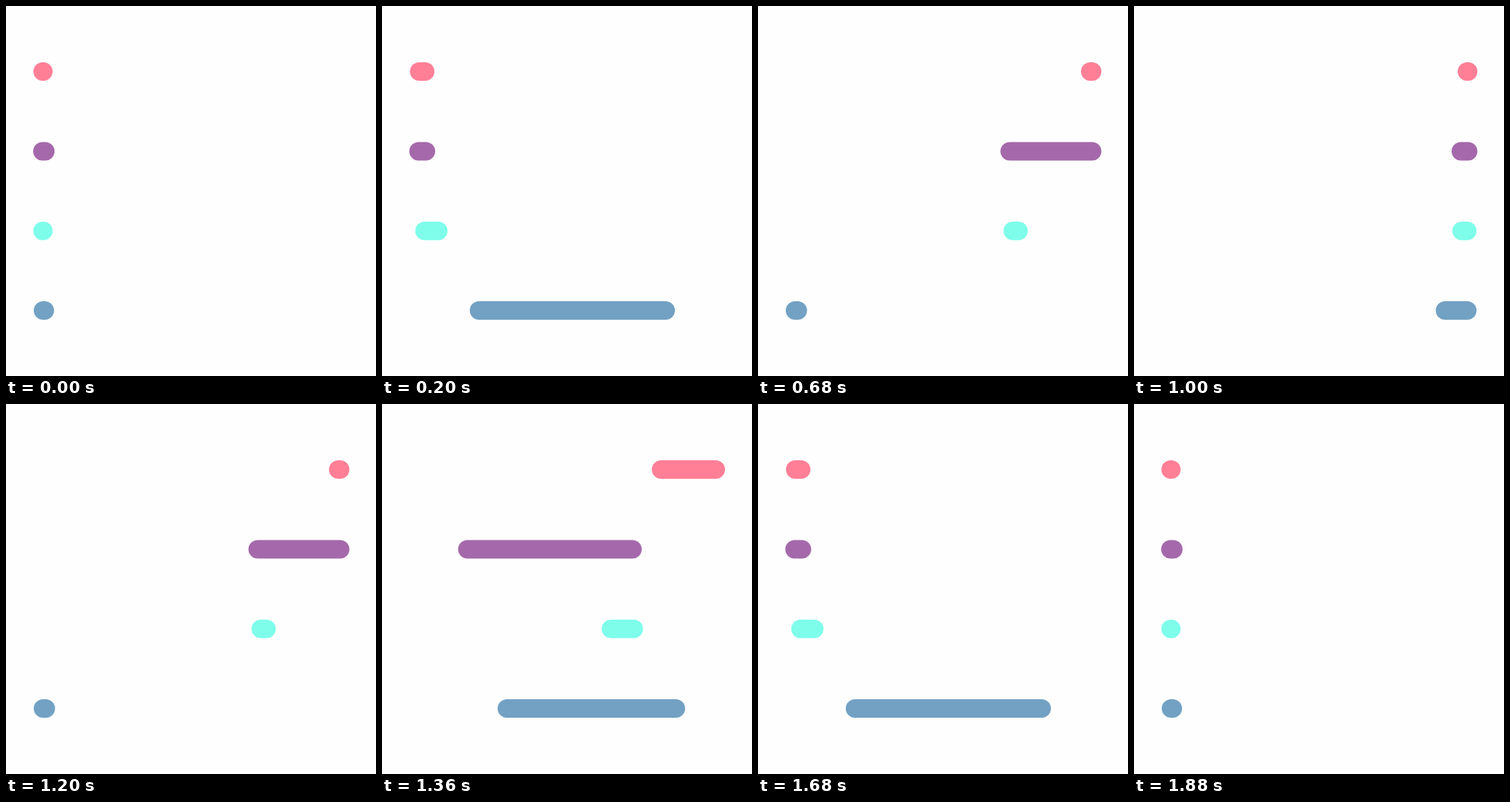
Write an HTML page that moves like this. It is 480 px wide and 480 px high and loops after 1920 ms.

```html
<!DOCTYPE html>
<html>
<head>
<meta charset="utf-8">
<style>
  html, body { margin: 0; height: 100%; overflow: hidden; background: #fefefe; }
  svg { display: block; width: 480px; height: 480px; }
</style>
</head>
<body>
<svg viewBox="0 0 480 480"></svg>
<script>
const STEP = 40, FRAMES = 48, HEIGHT = 24;

// Each edge of a bar is a curve through [ms, x] keys.
const bars = [
  { color: '#ff7f97', y: 73,
    left: [[0, 35.5], [280, 37], [400, 113], [500, 335], [680, 419], [920, 420]],
    right: [[0, 60.5], [200, 68], [300, 230], [400, 444], [680, 445.5], [920, 445.5]] },
  { color: '#a569ab', y: 176.5,
    left: [[0, 35.2], [400, 36], [460, 51], [540, 120], [680, 314.5], [780, 384.5], [880, 412], [920, 416]],
    right: [[0, 63], [200, 69], [300, 96], [400, 167], [540, 361], [620, 430], [680, 445.5], [920, 445.5]] },
  { color: '#7efdeb', y: 279.7,
    left: [[0, 35.5], [280, 50], [400, 151.5], [520, 285], [680, 318.5], [760, 335], [880, 413], [920, 419]],
    right: [[0, 60.5], [200, 85], [300, 190], [400, 328.5], [680, 350], [780, 415], [880, 444.3], [920, 445]] },
  { color: '#72a1c3', y: 383,
    left: [[0, 36], [140, 42], [320, 360], [400, 413], [520, 150], [580, 45], [680, 36], [740, 38], [800, 190], [880, 391.5], [920, 408]],
    right: [[0, 62.3], [200, 380], [280, 444], [400, 444.3], [500, 430], [560, 250], [620, 95], [680, 63.6], [780, 360], [880, 444.4], [920, 444.5]] }
];

const svg = document.querySelector('svg');
for (const bar of bars) {
  bar.rect = document.createElementNS(svg.namespaceURI, 'rect');
  const attrs = { y: bar.y, height: HEIGHT, rx: HEIGHT / 2, fill: bar.color };
  for (const name in attrs) bar.rect.setAttribute(name, attrs[name]);
  svg.append(bar.rect);
}

const secant = (a, b) => (b[1] - a[1]) / (b[0] - a[0]);

// Harmonic mean of the neighbouring slopes keeps the curve from overshooting.
function slope(keys, i) {
  if (!i || i === keys.length - 1) return 0;
  const a = secant(keys[i - 1], keys[i]), b = secant(keys[i], keys[i + 1]);
  return a * b > 0 ? 2 * a * b / (a + b) : 0;
}

function valueAt(keys, t) {
  let i = 0;
  while (i < keys.length - 2 && t >= keys[i + 1][0]) i++;
  const [t0, x0] = keys[i], [t1, x1] = keys[i + 1];
  const d = t1 - t0, u = (t - t0) / d, v = 1 - u;
  return v * v * (1 + 2 * u) * x0 + u * u * (1 + 2 * v) * x1
    + d * u * v * (v * slope(keys, i) - u * slope(keys, i + 1));
}

function draw() {
  const frame = Math.floor((performance.now() - start) / STEP) % FRAMES;
  const t = Math.min(frame, FRAMES - 1 - frame) * STEP; // there and back
  for (const bar of bars) {
    const x = valueAt(bar.left, t);
    bar.rect.setAttribute('x', x);
    bar.rect.setAttribute('width', valueAt(bar.right, t) - x);
  }
  requestAnimationFrame(draw);
}

const start = performance.now();
draw();
</script>
</body>
</html>
```
